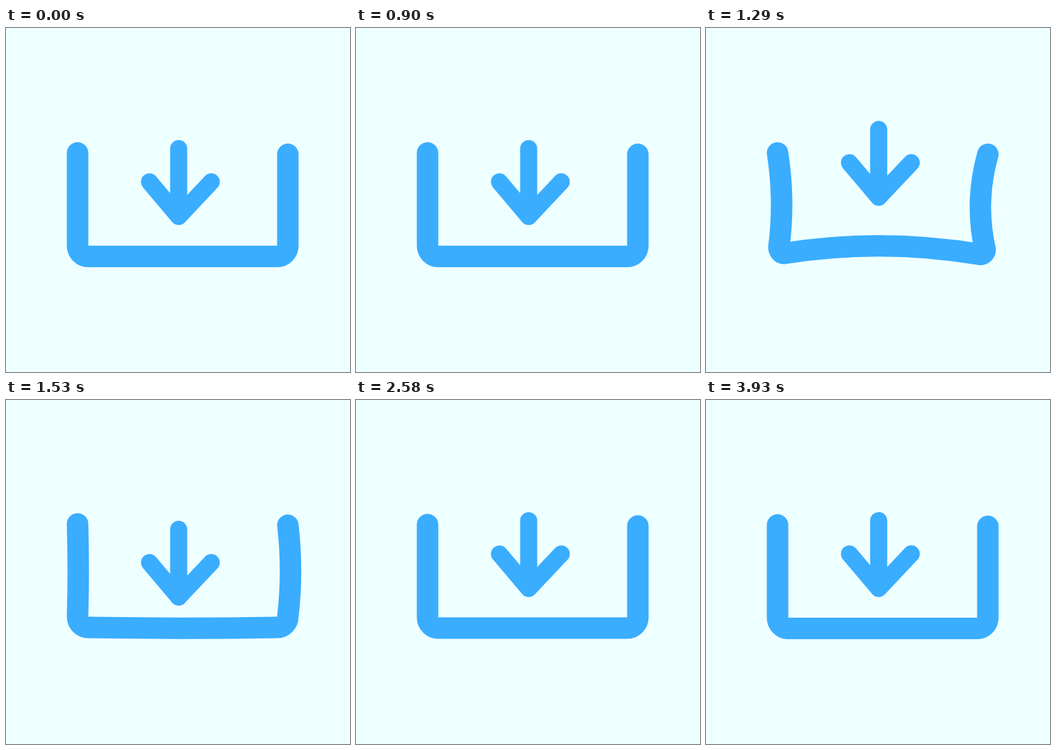
These frames come from a looping animation (512 px wide and 512 px high, 4.8 s). An HTML page:

```html
<!DOCTYPE html>
<html lang="en">
<head>
<meta charset="utf-8">
<title>Download tray</title>
<style>
  html, body { margin: 0; width: 100%; height: 100%; overflow: hidden; background: #eeffff; }
  svg { display: block; width: 100%; height: 100%; }
  path { fill: none; stroke: #3aadff; stroke-linecap: round; stroke-linejoin: round; }
</style>
</head>
<body>
<svg viewBox="0 0 512 512">
  <path id="tray" stroke-width="32"/>
  <path id="arrow" stroke-width="25.4" d="M257 179.5V280.5M213.5 229L257 280.5L305.5 229"/>
</svg>
<script>
const LOOP = 4800, STEP = 30, LANDING = 900;
const tray = document.getElementById('tray');
const arrow = document.getElementById('arrow');

// Outward bulge of each tray side: [time, left, right, bottom]
const BULGE = [
  [900, 0, 0, 0],
  [1050, 16, 15, 39],
  [1290, -5, -9, -12],
  [1530, -1, 4, 1.2],
  [1650, 9, 11, 9],
  [1860, 0, 0, 0]
];
// Vertical drift of the whole tray: [time, y]
const DRIFT = [
  [1350, 0], [1530, -1.5], [1720, -1.9], [1920, -1.7],
  [2210, 0.6], [2560, -0.4], [2900, 0.2], [3400, 0]
];

// Smooth curve through the keys, flat at every extreme
function sample(keys, col, t) {
  const last = keys.length - 1;
  if (t <= keys[0][0]) return keys[0][col];
  if (t >= keys[last][0]) return keys[last][col];
  const slope = i => (keys[i + 1][col] - keys[i][col]) / (keys[i + 1][0] - keys[i][0]);
  const tangent = i => {
    if (i === 0) return slope(0);
    if (i === last) return 0;
    const a = slope(i - 1), b = slope(i);
    return a * b <= 0 ? 0 : 2 * a * b / (a + b);
  };
  const i = keys.findIndex(k => k[0] > t) - 1;
  const span = keys[i + 1][0] - keys[i][0];
  const u = (t - keys[i][0]) / span, v = 1 - u;
  return keys[i][col] * (1 + 2 * u) * v * v + keys[i + 1][col] * u * u * (3 - 2 * u)
    + span * u * v * (tangent(i) * v - tangent(i + 1) * u);
}

const ease = u => u * u * (3 - 2 * u);

function arrowY(t) {
  if (t < 300 || t > 3930) return 0;
  if (t < 450) return 7 * ease((t - 300) / 150);
  if (t < 750) return 7 - 123 * ease((t - 450) / 300);
  if (t < LANDING) return -116 * (1 - ((t - 750) / 150) ** 2.5);
  const s = (t - LANDING) / 1000;
  return 70 * Math.sin(2 * Math.PI * 1.79 * s) * Math.exp(-2.16 * s);
}

function corner(from, tip, to) {
  const toward = p => [0, 1].map(i => p[i] + (tip[i] - p[i]) * 0.552);
  return `C${toward(from)} ${toward(to)} ${to}`;
}

function bow(from, to, dx, dy) {
  return `Q${(from[0] + to[0]) / 2 + 2 * dx} ${(from[1] + to[1]) / 2 + 2 * dy} ${to}`;
}

function trayPath(left, right, bottom) {
  const pinch = Math.max(0, -bottom / 12);
  const at = (x, y, dx, dy) => [x + dx * pinch, y + dy * pinch];
  const topL = [106.5, 186], topR = [419.5, 188];
  const sideL = at(106.5, 324, 2, 2), baseL = at(122.5, 340, -6, -4.5);
  const baseR = at(403.5, 340, 4.5, -3), sideR = at(419.5, 324, -4, 6);
  return `M${topL}` + bow(topL, sideL, -left, 0)
    + corner(sideL, at(106.5, 340, 2, -4), baseL)
    + bow(baseL, baseR, 0, bottom)
    + corner(baseR, at(419.5, 340, -4, -3), sideR)
    + bow(sideR, topR, right, 0);
}

function draw(now) {
  const t = Math.floor(now % LOOP / STEP) * STEP;
  arrow.setAttribute('transform', `translate(0 ${arrowY(t)})`);
  tray.setAttribute('d', trayPath(...[1, 2, 3].map(col => sample(BULGE, col, t))));
  tray.setAttribute('transform', `translate(0 ${sample(DRIFT, 1, t)})`);
}

const start = performance.now();
function tick() {
  draw(performance.now() - start);
  requestAnimationFrame(tick);
}
tick();
</script>
</body>
</html>
```
